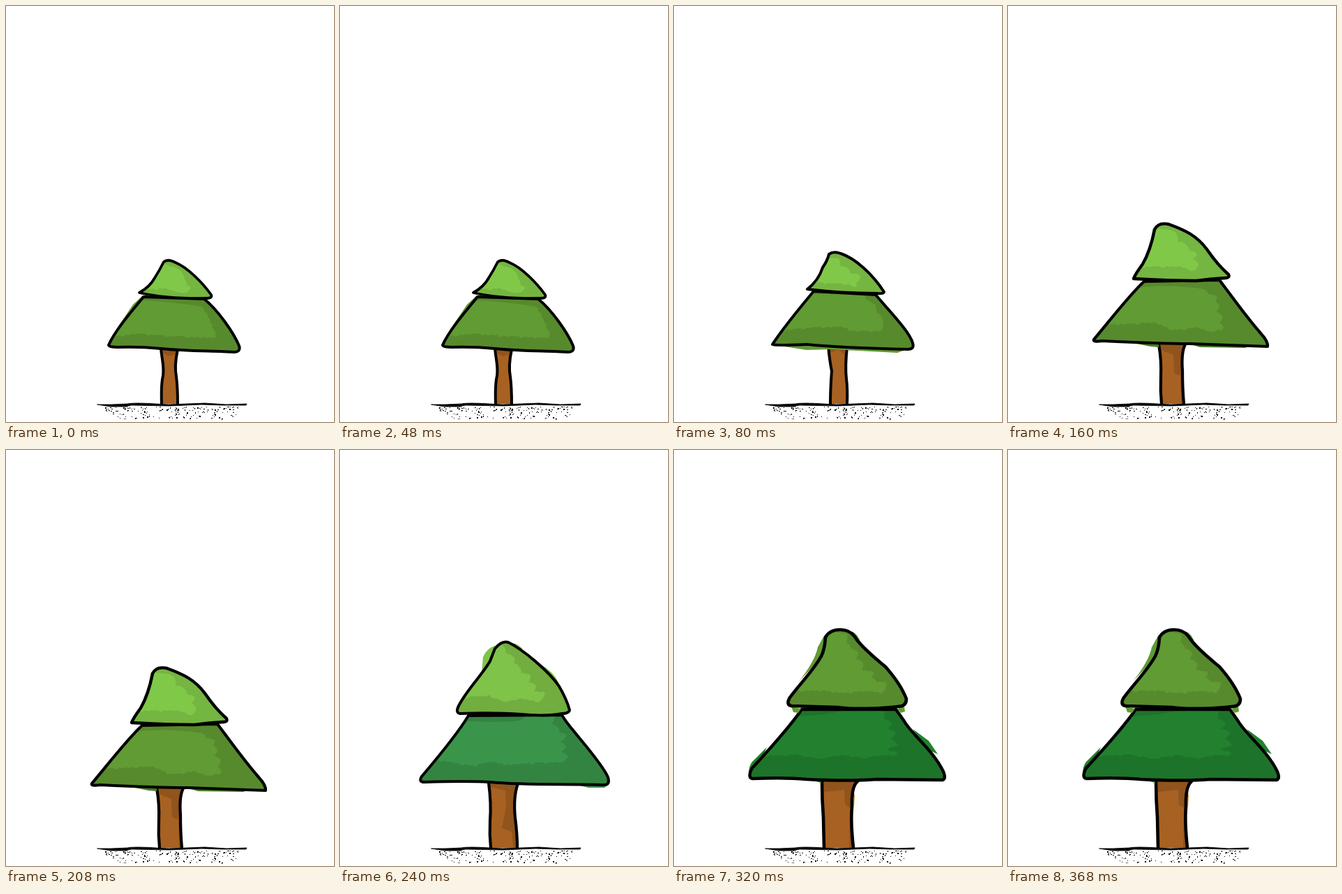
An HTML page with a canvas for the animation above (400 ms loop, 470 by 595 pixels).

```html
<!DOCTYPE html>
<html lang="en">
<head>
<meta charset="utf-8">
<title>Growing tree</title>
<style>
html, body { margin: 0; width: 100%; height: 100%; overflow: hidden; background: #fff; }
canvas { display: block; }
</style>
</head>
<body>
<canvas id="stage" width="470" height="595"></canvas>
<script>
const ctx = document.getElementById('stage').getContext('2d');
const STEP = 80;

const LIME = ['#80c948', '#75b541'];
const OLIVE = ['#619b33', '#578a2d'];
const SPRING = ['#7fc349', '#72ad40'];
const EMERALD = ['#3a954a', '#348441'];
const FOREST = ['#22812f', '#1e732a'];
const BARK = ['#a76122', '#91541d'];

function fill(path, color) {
  ctx.fillStyle = color;
  ctx.fill(path);
}

function ink(path, width) {
  ctx.strokeStyle = '#000';
  ctx.lineWidth = width;
  ctx.lineJoin = ctx.lineCap = 'round';
  ctx.stroke(path);
}

// Lit area: smooth on the upper left, leafy bumps along the listed edge.
function leafy(start, edge) {
  const path = new Path2D(start);
  path.lineTo(edge[0], edge[1]);
  for (let i = 2; i < edge.length; i += 2) {
    const [x, y, nx, ny] = edge.slice(i - 2, i + 2);
    const dx = nx - x, dy = ny - y;
    const length = Math.hypot(dx, dy);
    const count = Math.max(1, Math.round(length / 10));
    for (let k = 1; k <= count; k++) {
      const bump = (length > 14 ? 3 + 2 * Math.sin(k * 2.3 + i) : 2) / length;
      const mid = (k - 0.5) / count;
      path.quadraticCurveTo(x + dx * mid + dy * bump, y + dy * mid - dx * bump,
        x + dx * k / count, y + dy * k / count);
    }
  }
  path.closePath();
  return path;
}

function tier([light, dark], outline, start, edge, width = 4, spill = '', spillColor = light) {
  const shape = new Path2D(outline + 'Z');
  fill(new Path2D(spill), spillColor);
  fill(shape, dark);
  ctx.save();
  ctx.clip(shape);
  fill(leafy(start, edge), light);
  ctx.restore();
  ink(shape, width);
}

function trunk(left, right, back, shade, width = 4) {
  const body = new Path2D(`M${left} L${back}Z`);
  fill(body, BARK[0]);
  ctx.save();
  ctx.clip(body);
  fill(new Path2D(shade), BARK[1]);
  ctx.restore();
  ink(new Path2D('M' + left), width);
  ink(new Path2D('M' + right), width);
}

const poses = [
  () => {
    trunk('222 489C223 505 227 514 225 529Q222 541 223 569',
      '246 491Q241 515 244 530Q246 545 246 569',
      '246 569Q246 545 244 530Q241 515 246 491',
      'M222 489H248V540L240 515L242 498L234 501L223 496Z');
    tier(OLIVE, 'M197 416C180 437 157 463 147 485Q148 488 160 488Q192 487 222 490C260 494 300 493 326 495Q337 495 334 486C327 469 305 436 284 419',
      'M195 421Q238 423 281 430', [281, 430, 289, 445, 295, 460, 300, 474, 275, 473, 235, 471, 190, 468, 153, 472], 4,
      'M196 414L182 427L159 461L147 482L170 460Z');
    tier(LIME, 'M226 366Q232 361 243 367C260 374 281 395 294 413Q296 418 288 418Q230 419 191 410Q206 402 213 389Q220 378 226 366',
      'M190 409L224 368', [238, 373, 250, 379, 256, 391, 259, 400, 265, 403, 258, 410, 246, 409, 229, 403, 193, 405], 3.8);
  },
  () => {
    trunk('221 486Q223 508 226 522Q224 548 224 569',
      '248 488Q245 516 247 533Q249 548 248 569',
      '248 569Q249 548 247 533Q245 516 248 488',
      'M220 486H250V535L244 513L244 499L235 491L223 497Z');
    tier(OLIVE, 'M200 408C181 431 158 458 141 484Q145 486 190 484C230 488 290 490 335 491Q345 491 342 482C337 465 309 437 289 413',
      'M190 412H272L276 420', [288, 427, 290, 439, 296, 443, 300, 454, 297, 464, 258, 464, 238, 458, 200, 459, 152, 463], 4,
      'M145 485L190 492L225 491L320 496L337 490Z');
    tier(LIME, 'M222 355Q229 350 239 354C260 361 285 384 301 409Q300 412 290 411Q240 411 191 405Q207 393 213 374Q220 364 222 355',
      'M190 405L220 360', [236, 361, 238, 372, 250, 376, 253, 383, 265, 384, 266, 391, 261, 395, 261, 402, 250, 397, 193, 394]);
  },
  () => {
    trunk('216 484Q220 506 219 530Q218 550 220 569',
      '254 484Q248 495 250 522Q250 548 252 569',
      '252 569Q250 548 250 522Q248 495 254 484',
      'M216 484H255V569H248L247 529L238 525L237 499L219 492Z', 4.2);
    tier(OLIVE, 'M195 394C175 412 145 451 123 477Q121 481 135 479Q220 483 260 483L372 487Q373 480 362 468C340 443 316 409 303 392',
      'M180 403Q232 397 281 405', [281, 405, 287, 412, 299, 415, 297, 423, 303, 430, 298, 437, 308, 444, 303, 453, 309, 460, 292, 466, 270, 459, 237, 463, 210, 452, 143, 455], 4.2,
      'M180 482L204 487L216 488V482Z M262 484L275 488L340 489L350 485Z', '#497e29');
    tier(LIME, 'M210 320Q215 309 230 312C255 321 271 329 285 348Q300 370 316 384Q318 389 312 389Q292 390 270 393Q230 393 180 390Q182 384 193 369Q204 350 210 320',
      'M185 376L211 318', [230, 320, 241, 325, 243, 337, 254, 340, 260, 350, 271, 354, 265, 362, 273, 369, 268, 378, 245, 372, 190, 372], 4.4,
      'M208 316L203 345L195 361L212 334Z M260 325L276 337L288 351L272 340Z');
  },
  () => {
    trunk('213 476Q217 506 215 530Q214 550 216 569',
      '255 477Q248 496 251 526Q254 549 254 569',
      '254 569Q254 549 251 526Q248 496 255 477',
      'M213 476H257V569H248L246 546L232 541L238 510L237 487L215 482Z', 4.2);
    tier(EMERALD, 'M184 380C172 400 140 440 117 467Q112 475 121 475Q180 473 215 475C270 480 320 477 380 479Q387 478 384 468C376 450 350 421 335 402Q323 388 318 379',
      'M174 387Q226 391 258 387L272 377', [308, 380, 303, 392, 314, 399, 313, 405, 325, 407, 316, 418, 324, 424, 316, 432, 327, 438, 319, 446, 290, 446, 240, 449, 215, 445, 190, 451, 130, 441], 4,
      'M340 479L356 483L379 483L387 475Z');
    tier(SPRING, 'M222 284Q232 272 241 275C262 285 300 317 314 338Q325 357 329 372Q328 377 318 377C300 381 270 379 260 378Q220 375 172 377Q165 376 170 366C180 345 205 320 215 302',
      'M176 352L224 277', [234, 280, 238, 291, 250, 297, 249, 305, 256, 309, 260, 319, 273, 322, 270, 332, 281, 337, 277, 346, 294, 347, 287, 359, 258, 355, 235, 360, 214, 350, 178, 353], 4,
      'M203 319L205 296Q210 283 225 279L218 301Z M246 276Q257 277 263 287Z M284 305Q310 318 315 339Z');
  },
  () => {
    fill(new Path2D('M256 486L259 494L258 510L255 505Z'), '#d19332');
    trunk('212 473Q212 500 214 525L215 569',
      '263 474Q254 481 255 511Q253 532 257 569',
      '257 569Q253 532 255 511Q254 481 263 474',
      'M211 473H264V569H251L252 512L245 507L244 486L215 489Z', 4.6);
    tier(FOREST, 'M183 371C170 390 135 430 112 455Q105 468 112 470Q160 468 190 471Q250 474 290 471L385 472Q390 470 386 460C372 430 340 406 330 388Q323 378 318 371',
      'M172 381Q215 380 246 372', [301, 371, 300, 384, 312, 391, 305, 399, 318, 404, 311, 413, 321, 422, 301, 428, 320, 435, 296, 436, 270, 440, 240, 435, 210, 441, 175, 435, 118, 437], 4.4,
      'M133 425L112 446Q107 452 107 463L124 446Z M342 399L365 416L378 435L360 427Z M192 471L211 476V471Z');
    tier(OLIVE, 'M217 268Q223 257 238 257Q252 257 259 267C268 282 290 299 303 310Q325 335 333 356Q333 367 320 367C300 370 250 371 235 368Q200 367 168 366Q160 364 166 354C180 335 200 315 211 295Q216 285 217 268',
      'M174 346L216 258', [248, 263, 247, 275, 254, 284, 264, 290, 260, 299, 271, 305, 269, 315, 286, 318, 283, 325, 291, 332, 305, 333, 300, 346, 275, 344, 240, 347, 215, 343, 170, 344], 4.6,
      'M216 264L206 282Q202 302 179 331L211 297Z M254 259Q264 263 268 277Z M168 367L171 375L178 376L182 370Z M320 370L325 376L331 374L330 367Z');
  }
];

function ground() {
  const soil = new Path2D('M131 570L151 570L174 569Q183 567 214 569L233 570L285 568L316 570L345 569L344 571L310 571L280 570L235 572L180 571L170 573L150 573Z');
  fill(soil, '#000');
  ink(soil, 0.8);
  let seed = 41;
  const random = () => (seed = seed * 16807 % 2147483647) / 2147483647;
  for (let i = 0; i < 165; i++) {
    const depth = random() ** 1.35;
    const inset = 30 * depth * depth;
    const x = 136 + inset + random() * (201 - inset * 1.4);
    const wide = random() < 0.3 ? 2 : 1;
    ctx.fillRect(Math.round(x), Math.round(573 + depth * 17), wide, random() < 0.25 ? 2 : 1);
  }
}

function draw(time) {
  ctx.fillStyle = '#fff';
  ctx.fillRect(0, 0, 470, 595);
  poses[Math.floor(time / STEP) % poses.length]();
  ground();
}

const begin = performance.now();
function tick() {
  draw(performance.now() - begin);
  requestAnimationFrame(tick);
}
tick();
</script>
</body>
</html>
```
